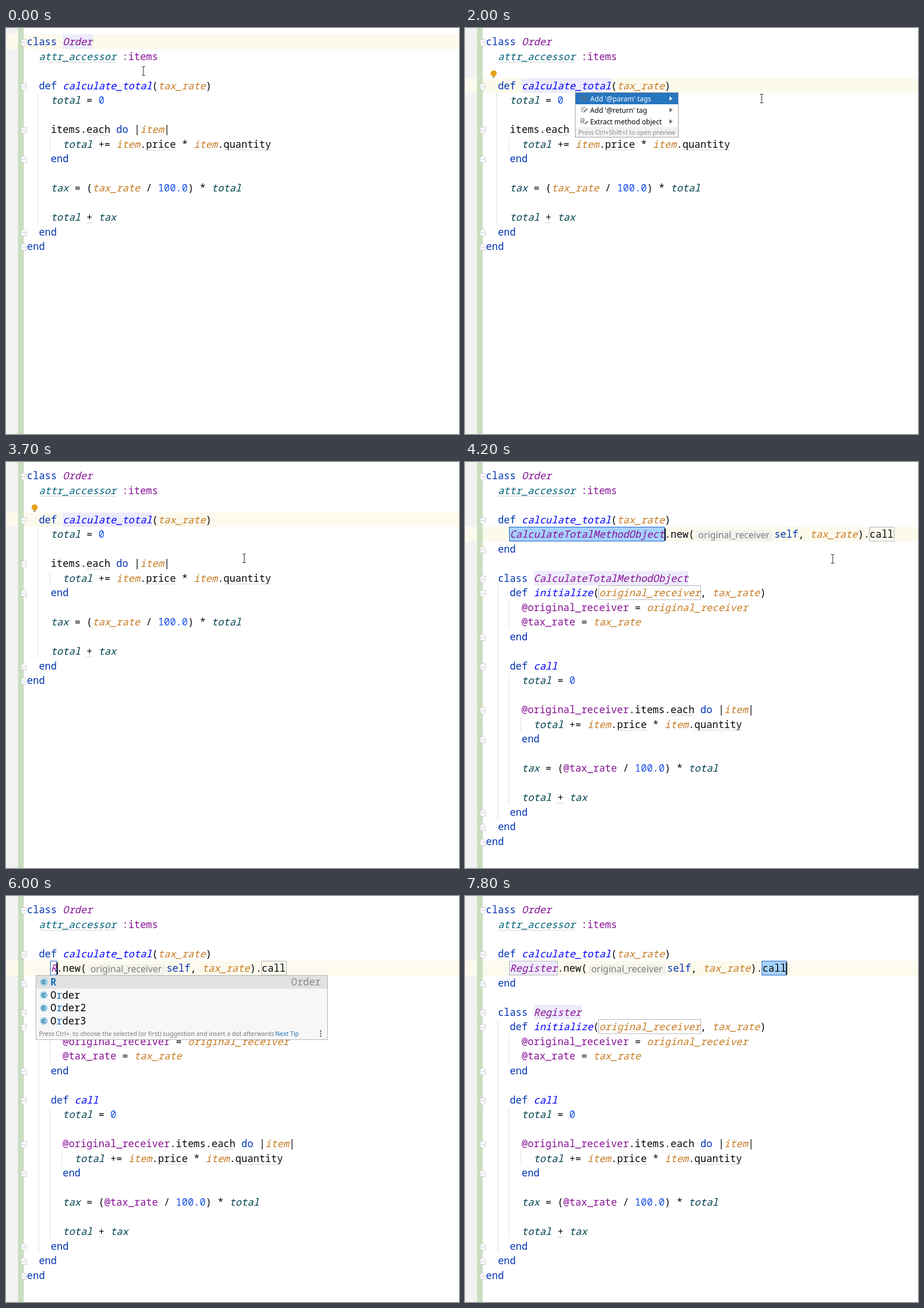
An HTML page that plays this animation: 791 px wide and 708 px high, repeating every 8 s.

```html
<!DOCTYPE html>
<html lang="en">
<head>
<meta charset="utf-8">
<title>Extract method object</title>
<style>
html, body { margin: 0; width: 100%; height: 100%; overflow: hidden; background: #fff; }
svg { display: block; }
text { white-space: pre; }
.code { font: 17.333px "Noto Sans Mono", "DejaVu Sans Mono", monospace; }
.ui { font-family: "Noto Sans", "Open Sans", sans-serif; }
.it { font-style: italic; }
</style>
</head>
<body>
<svg id="stage" width="791" height="708" viewBox="0 0 791 708"></svg>
<script>
const LOOP = 8000, CH = 10.4, LEFT = 36.6, ROW = 25.52, INLAY = 139.6;
const stage = document.getElementById('stage');

const before = `class Order
  attr_accessor :items

  def calculate_total(tax_rate)
    total = 0

    items.each do |item|
      total += item.price * item.quantity
    end

    tax = (tax_rate / 100.0) * total

    total + tax
  end
end`;

const after = (name, gap) => `class Order
  attr_accessor :items

  def calculate_total(tax_rate)
    ${name}.new(${gap}self, tax_rate).call
  end

  class ${name}
    def initialize(original_receiver, tax_rate)
      @original_receiver = original_receiver
      @tax_rate = tax_rate
    end

    def call
      total = 0

      @original_receiver.items.each do |item|
        total += item.price * item.quantity
      end

      tax = (@tax_rate / 100.0) * total

      total + tax
    end
  end
end`;

// Time tables: [start, value]
const names = [[0, 'CalculateTotalMethodObject'], [5900, 'R'], [6100, 'Re'], [6500, 'Reg'],
  [6600, 'Regi'], [6900, 'Regis'], [7100, 'Regist'], [7300, 'Register']];
const mouse = [[0, [240, 75]], [100, [222, 86]], [300, [216, 90]], [400, [206, 96]], [500, [199, 100]],
  [600, [198, 101]], [700, [197, 101]], [800, [197, 102]], [2000, [518, 123]], [2100, [603, 62]],
  [2200, [540, 100]], [2300, [425, 142]], [2400, [326, 166]], [3000, [360, 172]], [3600, [378, 176]],
  [3700, [416, 168]], [3800, [505, 164]], [3900, [590, 165]], [4200, [642, 169]], [4300, [640, 177]],
  [4500, [640, 184]], [4600, [640, 189]], [5900, null]];
const at = (table, t) => table.filter(s => s[0] <= t).pop()[1];
const within = (t, a, b) => t >= a && t < b;

const colX = c => LEFT + c * CH;
const rowY = r => Math.round(11 + r * ROW);
const esc = s => s.replace(/&/g, '&amp;').replace(/</g, '&lt;');
const rect = (x, y, w, h, fill, extra = '') =>
  `<rect x="${x}" y="${y}" width="${w}" height="${h}" fill="${fill}" ${extra}/>`;
const path = (d, stroke, fill = 'none', w = 1) =>
  `<path d="${d}" stroke="${stroke}" fill="${fill}" stroke-width="${w}"/>`;
const text = (x, y, s, fill, cls, size, extra = '') =>
  `<text x="${x}" y="${y}" fill="${fill}" class="${cls}"${size ? ` style="font-size:${size}px"` : ''} ${extra}>${esc(s)}</text>`;

function styleOf(word, prev) {
  if (prev === 'def') return ['#0000ff', 1];
  if (/^(class|def|do|end|self)$/.test(word)) return ['#0033b3'];
  if (/^[A-Z]/.test(word)) return ['#871094', 1];
  if (/^[@:]\w/.test(word)) return ['#871094'];
  if (/^\d/.test(word)) return ['#1750eb'];
  if (/^(item|tax_rate|original_receiver)$/.test(word)) return ['#c77b22', 1];
  if (/^(total|tax)$/.test(word)) return ['#00434f', 1];
  if (word === 'attr_accessor') return ['#00627a', 1];
  return ['#080808'];
}

function squiggle(x, y, w) {
  let d = `M${x} ${y}`;
  for (let i = 2; i <= w; i += 2) d += `l2 ${i % 4 ? -1.6 : 1.6}`;
  return path(d, '#c4c4c4', 'none', 0.9);
}

function codeLine(line, row) {
  const y = rowY(row) + 19;
  let out = '', x = LEFT, prev = '';
  for (const tok of line.match(/¤|\s+|[@:]?\w+(\.\d+)?|[^\w\s@:¤]+/g) || []) {
    if (tok === '¤') {
      out += rect(x + 2.5, y - 13, 135, 19, '#f3f2ed', 'rx="4"')
        + text(x + 7, y + 1, 'original_receiver', '#7d7d7d', 'ui', 16);
      x += INLAY;
      continue;
    }
    if (tok.trim()) {
      const [fill, italic] = styleOf(tok, prev);
      out += text(x.toFixed(2), y, tok, fill, italic ? 'code it' : 'code');
      if (/^(each|price|quantity|\+|attr_accessor)$/.test(tok))
        out += squiggle(x, y + 4.5, tok.length * CH);
      prev = tok;
    }
    x += tok.length * CH;
  }
  return out;
}

const guide = (x, r1, r2) => rect(x, rowY(r1), 1, rowY(r2 + 1) - rowY(r1), '#e2e2e2');

function fold(row, dir) {
  const y = rowY(row) + (dir > 0 ? 15 : 13.5);
  return path(`M26.5 ${y - 6 * dir}h9v${8 * dir}l-4.5 ${4.5 * dir}l-4.5 ${-4.5 * dir}z`, '#c8c8c8', '#fff')
    + path(`M28.5 ${y - 0.5 * dir}h5`, '#b8b8b8');
}

const mark = (row, col, len) => rect(colX(col), rowY(row), len * CH, 25, '#edebfc');
const frame = (x, row, w, stroke, fill = 'none') =>
  rect(Math.round(x) - 0.5, rowY(row) + 0.5, Math.round(w) + 1, 24.5, fill, `stroke="${stroke}"`);
const caretAt = (x, row) => rect(Math.round(x) - 0.5, rowY(row) + 3, 2, 21, '#000');

const bulb = () => `<circle cx="50" cy="79" r="5.3" fill="#e6a117"/>`
  + rect(47.5, 82, 5, 2.5, '#e6a117') + rect(47.5, 85.2, 5, 1.2, '#6e6e6e');

function actionIcon(x, y, i) {
  if (i === 2)
    return path(`M${x} ${y + 4}v-9h3q2.5 0 2.5 2.3t-2.5 2.3h-3m3 0l2.5 4.4`, '#6e6e6e', 'none', 1.1)
      + path(`M${x + 7} ${y + 4.5}l5 -5`, '#6e6e6e', 'none', 2);
  return path(`M${x} ${y - 4}h8M${x} ${y - 1}h5M${x} ${y + 2}h3`, '#6e6e6e', 'none', 1.1)
    + path(`M${x + 4.5} ${y + 4}l6.5 -6.5`, '#6e6e6e', 'none', 2.2);
}

function actionMenu(sel) {
  let out = rect(192.5, 112.5, 180, 78, '#fff', 'stroke="#a5a5a5"') + rect(193, 173, 179, 17, '#f2f2f2');
  ["Add '@param' tags", "Add '@return' tag", 'Extract method object'].forEach((s, i) => {
    const y = 123 + i * 20;
    if (i === sel) out += rect(193, y - 10, 179, 20, '#2675bf');
    out += actionIcon(202.5, y, i) + text(218.5, y + 4.5, s, i === sel ? '#fff' : '#000', 'ui', 12.1)
      + path(`M357 ${y - 4}l5.5 4l-5.5 4z`, 'none', i === sel ? '#e8eef5' : '#6e6e6e');
  });
  return out + text(198, 185.5, 'Press Ctrl+Shift+I to open preview', '#8a8a8a', 'ui', 10.667);
}

function completion() {
  const blue = '#1f6fb8';
  let out = rect(52.5, 138.5, 509, 112, '#f7f7f7', 'stroke="#b2b2b2"') + rect(53, 139, 508, 22.5, '#dfe1e3');
  ['R', 'Order', 'Order2', 'Order3'].forEach((s, i) => {
    const y = 150 + i * 22.7, base = Math.round(y + 6);
    out += `<circle cx="66" cy="${y}" r="6.5" fill="#8fcbe6"/>`
      + path(`M68 ${y - 1.7}a2.6 2.6 0 1 0 0 3.4`, '#33566a', 'none', 1.2);
    if (!i) out += text(77.5, base, s, blue, 'code', 0, 'font-weight="700" style="font-weight:700"');
    else out += text(77.5, base, 'O', '#000', 'code') + text(77.5 + CH, base, 'r', blue, 'code')
      + text(77.5 + 2 * CH, base, s.slice(2), '#000', 'code');
  });
  out += text(498, 156, 'Order', '#8c8c8c', 'code')
    + text(57.5, 244, 'Press Ctrl+. to choose the selected (or first) suggestion and insert a dot afterwards', '#787878', 'ui', 10.667)
    + text(470, 244, 'Next Tip', '#2470b3', 'ui', 10.667);
  for (const y of [235.5, 240, 244.5]) out += `<circle cx="549.5" cy="${y}" r="1.4" fill="#6e6e6e"/>`;
  return out;
}

function pointer(t) {
  const p = at(mouse, t);
  if (!p) return '';
  const [x, y] = p;
  if (within(t, 2400, 3300))
    return path(`M${x} ${y}v16l3.7 -3.5l2.5 5.7l2.4 -1l-2.5 -5.6h5z`, '#fff', '#000');
  const d = `M${x - 3} ${y - 7.5}h2.5l.5 .5l.5 -.5h2.5M${x} ${y - 7}v14M${x - 3} ${y + 7.5}h2.5l.5 -.5l.5 .5h2.5`;
  return path(d, '#fff', 'none', 3) + path(d, '#333', 'none', 1.1);
}

function scene(t) {
  const done = t >= 3900, ready = t >= 4200;
  const name = at(names, t), len = name.length;
  const row = done ? 4 : t >= 500 ? 3 : 0;
  const src = done ? after(name, ready ? '¤' : '') : before;
  let out = rect(0, 0, 21, 708, '#f2f2f2') + rect(0, rowY(row), 791, rowY(row + 1) - rowY(row), '#fcfaed')
    + rect(21, 0, 10, 708, '#c9dec1');

  if (!done) {
    out += t < 1000 ? mark(0, 6, 5) : mark(3, 6, 15);
    out += guide(55, 4, 12) + guide(76, 7, 7);
  }
  const callX = colX(4 + len + 5 + 16) + INLAY;
  const tabbed = t >= 7700;
  if (ready) {
    out += guide(57, 8, 23).replace(/y="\d+" width="1" height="\d+"/, `y="${rowY(8)}" width="1" height="${rowY(24) - rowY(8)}"`)
      + guide(76, 9, 10) + guide(76, 14, 22) + guide(97, 17, 17) + mark(7, 8, len);
    if (tabbed) {
      out += frame(colX(4), 4, len * CH, '#b5b5b5', t >= 7800 ? '#edebfc' : 'none')
        + frame(callX, 4, 4 * CH, '#1d5fc4', '#a6d2ff');
    } else {
      out += frame(colX(4), 4, len * CH, '#1d5fc4', t < 5900 ? '#a6d2ff' : '#fff')
        + frame(callX, 4, 4 * CH, '#b5b5b5');
    }
    out += frame(colX(19), 8, 17 * CH, '#b5b5b5');
  }

  out += src.split('\n').map(codeLine).join('');

  const starts = !done ? [0, 3, 6] : ready ? [0, 3, 7, 8, 13, 16] : [0];
  const ends = !done ? [8, 13, 14] : ready ? [5, 11, 18, 23, 24, 25] : [25];
  out += starts.map(r => fold(r, 1)).join('') + ends.map(r => fold(r, -1)).join('');

  if (within(t, 500, 1000)) out += caretAt(colX(15), 3);
  if (done && !within(t, 4800, 5300)) out += caretAt(tabbed ? callX + 4 * CH : colX(4 + len), 4);
  if (within(t, 1400, 3900)) out += bulb();
  if (within(t, 1400, 3300)) out += actionMenu(t >= 2400 ? 2 : 0);
  if (within(t, 6000, 6100)) out += completion();
  return out + pointer(t);
}

let shown = '';
function draw(now) {
  const next = scene(Math.floor(now % LOOP / 100) * 100);
  if (next !== shown) stage.innerHTML = shown = next;
  requestAnimationFrame(draw);
}
const begin = performance.now();
draw(0);
requestAnimationFrame(function tick() {
  shown = shown;
});
</script>
</body>
</html>
```
